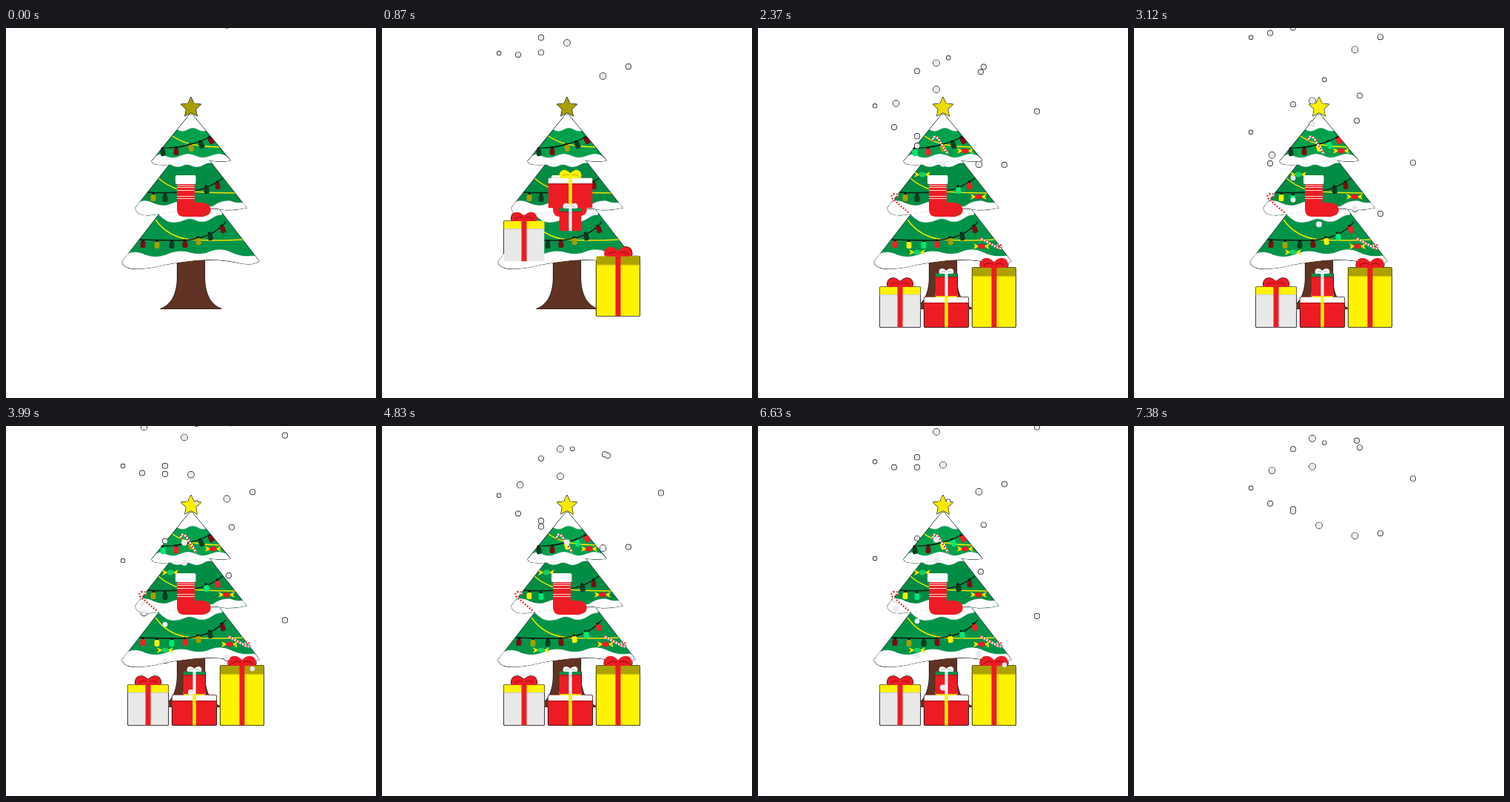
Animation of 500x500 px, one loop 7410 ms. Source, as an HTML page with a canvas:

```html
<!DOCTYPE html>
<html lang="en">
<head>
<meta charset="utf-8">
<title>Christmas tree</title>
<style>
html, body { margin: 0; width: 100%; height: 100%; overflow: hidden; background: #fff; }
canvas { display: block; width: 500px; height: 500px; }
</style>
</head>
<body>
<canvas id="stage" width="500" height="500"></canvas>
<script>
const ctx = document.getElementById('stage').getContext('2d');
const LOOP = 7410, STEP = 30, TREE_END = 7380;
const RED = '#ed1c24', YELLOW = '#fff200', INK = '#0b0b12';

const clamp = v => Math.max(0, Math.min(1, v));
const easeOut = p => 1 - Math.pow(1 - p, 3);

function fill(path, color) {
  ctx.fillStyle = color;
  ctx.fill(path);
}
function line(path, color, width) {
  ctx.strokeStyle = color;
  ctx.lineWidth = width;
  ctx.stroke(path);
}
function rect(x, y, w, h, color) {
  ctx.fillStyle = color;
  ctx.fillRect(x, y, w, h);
}
function at(x, y, draw) {
  ctx.save();
  ctx.translate(x, y);
  draw();
  ctx.restore();
}

// Each tier: a green body whose hem doubles as the lower edge of its snow.
function tier(color, top, hem, cap, drift, yellow, cord) {
  return {
    color,
    body: new Path2D(top + hem + 'Z'),
    snow: new Path2D(drift + hem + 'Z'),
    cap: new Path2D(cap),
    yellow: new Path2D(yellow),
    cord: new Path2D(cord)
  };
}
const tiers = [
  tier('#009448', 'M157 316 L212 245 L288 245 L342 315',
    'Q334 321 318 318 Q288 311 255 314 Q225 317 200 323 Q160 330 157 316',
    'M205 245 L294 245 L291 252 Q284 252 279 256 Q268 264 258 260 Q249 255 241 259 Q228 265 217 260 Q211 256 207 252 Z',
    'M157 316 L165 305 Q176 301 188 307 Q202 312 216 307 Q234 299 249 304 Q264 308 277 302 Q290 297 303 303 Q318 311 336 308 L342 315',
    'M202 259 Q219 283 250 286 Q285 288 320 286',
    'M179 286 Q215 287 240 287 Q280 284 297 262'),
  tier('#008c43', 'M175 243 L226 178 L274 178 L325 243',
    'Q312 246 298 246 Q275 241 252 245 Q225 249 208 251 Q176 257 175 243',
    'M223 178 L277 178 L278 182 Q271 181 266 185 Q259 189 252 186 Q244 182 238 186 Q229 189 223 184 Z',
    'M175 243 L181 235 Q190 232 199 237 Q212 243 223 238 Q238 231 251 237 Q266 244 280 241 Q291 233 303 234 Q312 238 320 236 L325 243',
    'M206 203 Q226 220 250 221 Q280 223 310 223',
    'M191 222 Q220 224 250 221 Q275 217 293 203'),
  tier('#00a04c', 'M197 180 L245 121 Q250 112 255 121 L303 179',
    'Q290 182 272 178 Q245 182 225 184 Q198 187 197 180',
    'M232 137 L245 121 Q250 112 255 121 L270 138 Q265 140 260 137 Q252 132 245 137 Q239 141 232 137 Z',
    'M197 180 L203 173 Q210 169 217 174 Q226 178 236 173 Q246 168 256 173 Q266 178 277 173 Q288 168 297 173 L303 179',
    'M222 144 Q237 155 255 158 Q272 161 290 161',
    'M209 162 Q230 163 250 157 Q266 153 277 146')
];
const trunk = new Path2D('M231.5 310 L268.5 310 L268.5 340 Q270 372 291 379.5 L209 379.5 Q230 372 231.5 340 Z');

const star = new Path2D();
for (let i = 0; i < 10; i++) {
  const r = i % 2 ? 6.8 : 14, a = i * Math.PI / 5;
  star.lineTo(250 + r * Math.sin(a), 107.5 - r * Math.cos(a));
}
star.closePath();

// Bulbs: x, y, colour, tilt, group
const bulbColors = {
  g: ['#0b3d20', '#00e874'],
  r: ['#7a0d12', '#ff1d28'],
  y: ['#a89f00', '#fff200']
};
const bulbs = [
  [212, 168, 'g', -.15, 1], [230, 167, 'r', 0, 1], [250, 162, 'y', -.3, 0],
  [264, 158, 'g', -.4, 0], [277, 152, 'r', -.5, 0],
  [199, 229, 'y', .05, 0], [215, 230, 'g', 0, 0], [271, 219, 'g', -.15, 1], [286, 213, 'r', -.1, 1],
  [185, 292, 'r', .05, 1], [204, 293, 'y', 0, 1], [224, 293, 'g', 0, 1], [242, 292, 'r', -.05, 1],
  [260, 288, 'y', -.15, 0], [276, 282, 'g', -.25, 0], [293, 272, 'r', -.35, 0]
];

const sweets = [[280, 166, RED], [222, 198, '#16d166'], [298, 228, RED], [215, 303, '#16d166'], [302, 295, RED]];
const canes = [
  [247, 158, 'M237 153 Q235 146 240 147 Q243 148 245 152 L257 171'],
  [192, 237, 'M188 229 Q190 223 184 224 Q178 226 182 231 L204 250'],
  [314, 291, 'M300 284 L324 297 Q331 300 329 294 Q326 291 323 294']
].map(([x, y, d]) => [x, y, new Path2D(d)]);

function gift(o) {
  const { x, y, w, h, bow: [bw, bh] } = o;
  const cx = x + w / 2, b = y + .5;
  const px = k => cx + k * bw / 2, py = k => b - k * bh;
  o.box = new Path2D();
  o.box.roundRect(x, y, w, h, 2);
  o.knot = new Path2D();
  o.folds = new Path2D();
  for (const s of [-1, 1]) {
    o.knot.moveTo(cx, py(.6));
    o.knot.quadraticCurveTo(px(s * .35), py(1.1), px(s * .65), py(1));
    o.knot.quadraticCurveTo(px(s * .98), py(.9), px(s), py(.3));
    o.knot.quadraticCurveTo(px(s), b, px(s * .8), b);
    o.knot.lineTo(cx, b);
    o.knot.closePath();
    o.folds.moveTo(px(s * .75), py(.2));
    o.folds.quadraticCurveTo(px(s * .4), py(.65), px(s * .1), py(.35));
  }
  return o;
}
const gifts = [
  gift({ x: 164.5, y: 349.5, w: 55, h: 55, lid: 10.5, top: YELLOW, body: '#e9e9e9', shade: '#d2d2d2', ribbon: RED, rw: 7,
    bow: [35, 12], fold: '#a80f16', start: 300, time: 1425, drop: 412 }),
  gift({ x: 289.5, y: 323.5, w: 59, h: 81, lid: 11.5, top: '#aca300', body: YELLOW, shade: '#d9ce00', ribbon: RED, rw: 7,
    bow: [38, 13], fold: '#a80f16', start: 30, time: 1260, drop: 412 }),
  gift({ x: 224.5, y: 363.5, w: 60, h: 41, lid: 7.5, top: '#ffffff', body: RED, shade: '#b3141b', ribbon: YELLOW, rw: 4.5,
    bow: [30, 11], fold: '#cfc200', start: 392, time: 1778, drop: 412 }),
  gift({ x: 239.5, y: 331.5, w: 30, h: 31, lid: 4.5, top: '#00924a', body: RED, shade: '#b3141b', ribbon: '#ffffff', rw: 4,
    bow: [20, 7], fold: '#c9c9d0', start: 300, time: 1500, drop: 370 })
];

// Flakes: x, y at 1650 ms, speed in px/s, radius
const flakes = [
  [158, 71, 47.4, 2.5], [184, 87, 65.3, 3.2], [215, 92, 75.3, 3.4], [215, 89, 97.5, 3.4],
  [215, 15, 60, 3.2], [250, 105, 109, 4.1], [298.5, 127, 79.5, 4.1], [333, 121, 88.5, 3.3],
  [241, -1.5, 68, 4.1], [241, 38, 62.7, 4.1], [186.5, 35, 93, 4], [257.3, 12, 39.3, 2.5],
  [305, 15, 52, 3.2], [377, 46, 92.5, 3.4], [301, -4, 88, 3.2]
];
const waves = [0, 2700, 5460], WAVE_LIFE = 4410;

function snowfall(t) {
  const out = new Path2D();
  for (const w of waves) {
    const age = t - w;
    if (age < 0 || age > WAVE_LIFE) continue;
    for (const [x, y, v, r] of flakes) {
      const cy = y + v * (age - 1650) / 1000;
      out.moveTo(x + r, cy);
      out.arc(x, cy, r, 0, Math.PI * 2);
    }
  }
  return out;
}

const giftShift = (g, t) => -g.drop * (1 - easeOut(clamp((t - g.start) / g.time)));

function drawStocking() {
  fill(new Path2D('M231 209 H255 V236 Q268 235 274 239 Q279 245 275 251 Q270 256 258 255 H241 Q231 255 231 245 Z'), RED);
  for (const y of [212.5, 215, 219, 227, 230]) rect(231, y, 24, 1, '#ffd9da');
  const cuff = new Path2D();
  cuff.roundRect(229, 199, 27.5, 12, 2);
  fill(cuff, '#fff');
}

function drawBulb([x, y, hue, tilt, group], lit) {
  at(x, y, () => {
    ctx.rotate(tilt);
    rect(-1.8, -6.5, 3.6, 4, '#101a12');
    const glass = new Path2D();
    glass.roundRect(-3.4, -4, 6.8, 9, 2);
    fill(glass, bulbColors[hue][lit === group ? 1 : 0]);
  });
}

function drawSweet([x, y, color], scale) {
  at(x, y, () => {
    ctx.scale(scale, scale);
    fill(new Path2D('M-3 0 L-11 -4 L-9 0 L-11 4 Z M3 0 L11 -4 L9 0 L11 4 Z'), '#f5e400');
    const core = new Path2D();
    core.ellipse(0, 0, 4.8, 3.4, 0, 0, Math.PI * 2);
    fill(core, color);
  });
}

function drawCane([x, y, path], scale) {
  at(x, y, () => {
    ctx.scale(scale, scale);
    ctx.translate(-x, -y);
    line(path, '#fff', 2.6);
    ctx.setLineDash([1.8, 2.2]);
    line(path, RED, 2.4);
    ctx.setLineDash([]);
  });
}

function drawTree(t) {
  fill(trunk, '#603324');
  for (const s of tiers) {
    fill(s.body, s.color);
    ctx.save();
    ctx.clip(s.body);
    line(s.yellow, '#f2e600', 1.5);
    line(s.cord, '#0c1a10', 1.4);
    line(s.cap, '#d5deea', 1.4);
    fill(s.cap, '#fff');
    line(s.snow, '#dfe6ef', 1.2);
    ctx.restore();
    fill(s.snow, '#fff');
  }
  const glow = t < 1770 ? 0 : (1 - Math.cos((t - 1770) / 900 * Math.PI * 2)) / 2;
  fill(star, `rgb(${168 + 87 * glow}, ${160 + 82 * glow}, 0)`);

  const lit = t < 1770 ? -1 : Math.floor((t - 1770) / 900) % 2 ? 0 : 1;
  bulbs.forEach(b => drawBulb(b, lit));
  const pop = easeOut(clamp((t - 2000) / 500));
  if (pop > 0) {
    sweets.forEach(s => drawSweet(s, pop));
    canes.forEach(c => drawCane(c, pop));
  }
  drawStocking();
}

function drawGift(g) {
  const { x, y, w, h, lid, rw } = g, cx = x + w / 2;
  ctx.save();
  ctx.clip(g.box);
  rect(x, y, w, h, g.body);
  rect(x, y + lid, w, 1.2, g.shade);
  rect(x, y, w, lid, g.top);
  rect(cx - rw / 2, y, rw, h, g.ribbon);
  ctx.restore();
  fill(g.knot, g.ribbon);
  line(g.folds, g.fold, 1.2);
}

function draw(t) {
  const snow = snowfall(t), showTree = t < TREE_END;
  ctx.fillStyle = '#fff';
  ctx.fillRect(0, 0, 500, 500);
  ctx.lineJoin = 'round';

  // Dark rims go below every fill, so they only show against the white.
  if (showTree) {
    for (const p of [trunk, star, ...tiers.map(s => s.body)]) line(p, INK, 1.2);
    for (const g of gifts) at(0, giftShift(g, t), () => {
      line(g.box, INK, 1.2);
      line(g.knot, INK, 1.2);
    });
  }
  line(snow, INK, 1.4);

  if (showTree) {
    drawTree(t);
    for (const g of gifts) at(0, giftShift(g, t), () => drawGift(g));
  }
  fill(snow, '#eaeaf1');
}

const began = performance.now();
function tick() {
  const t = (performance.now() - began) % LOOP;
  draw(Math.floor(t / STEP) * STEP);
  requestAnimationFrame(tick);
}
tick();
</script>
</body>
</html>
```
